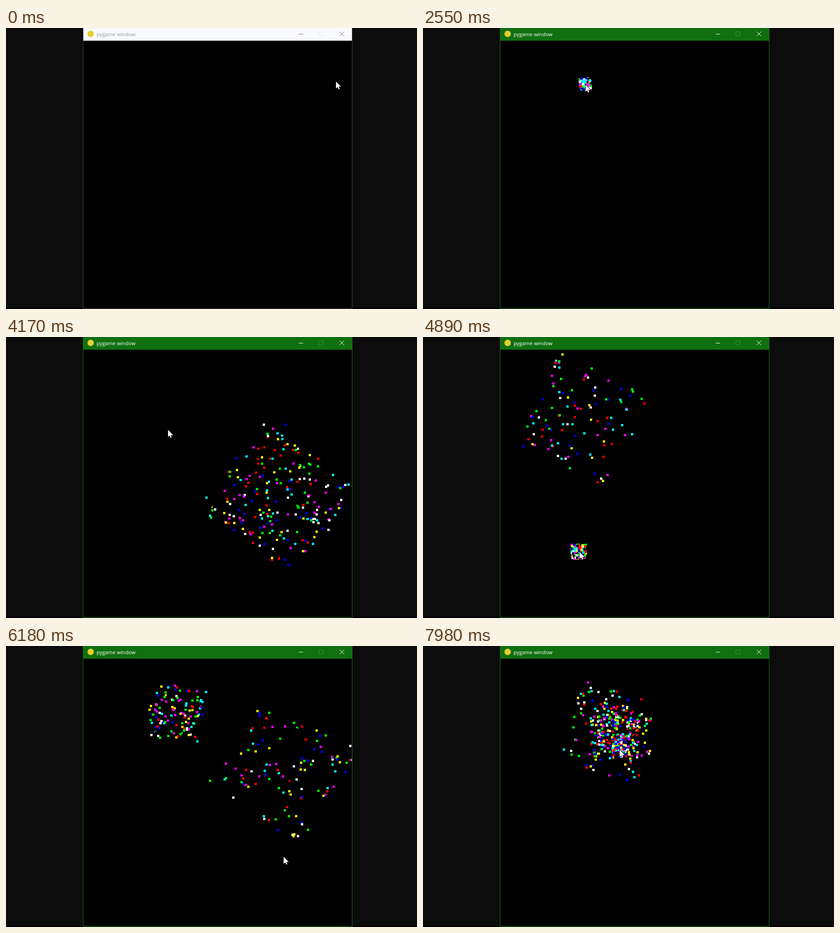
An HTML page with a canvas for the animation above (8000 ms loop, 903x620 px).

```html
<!DOCTYPE html>
<html lang="en">
<head>
<meta charset="utf-8">
<title>pygame window</title>
<style>
  html, body { margin: 0; width: 100%; height: 100%; overflow: hidden; background: #0c0c0c; }
  svg, canvas { position: absolute; left: 0; top: 0; display: block; }
  text { font: 11.3px "Open Sans", "Noto Sans", sans-serif; }
</style>
</head>
<body>
<svg width="903" height="620" viewBox="0 0 903 620">
  <rect width="903" height="620" fill="#0c0c0c"/>
  <rect y="617" width="903" height="3" fill="#050105"/>
  <rect id="frame" x="169" y="0" width="592" height="619"/>
  <rect id="bar" x="170" y="0" width="590" height="28"/>
  <rect x="170" y="28" width="590" height="590" fill="#000"/>
  <circle cx="186" cy="13" r="7" fill="#e6cf2e"/>
  <text id="title" x="199" y="18">pygame window</text>
  <path id="icons" d="M643 13.5h10M733 8l10 10M743 8l-10 10" fill="none"/>
  <rect id="max" x="687.5" y="8.5" width="9" height="9" fill="none"/>
</svg>
<canvas id="stage" width="903" height="620"></canvas>
<script>
const LOOP = 8000, STEP = 30;
const COUNT = 125, LIFE = 915, SIZE = 5, HOLD = 70;
const ROAM = 630, SETTLE = 2250;
const ctx = document.getElementById("stage").getContext("2d");

// where the mouse is pressed: time, x, y
const clicks = [
  [2485, 357, 124], [3355, 602, 377], [3420, 602, 377], [4200, 351, 200],
  [4810, 342, 474], [5424, 611, 290], [5850, 375, 150], [6213, 627, 486],
  [6690, 268, 482], [7055, 485, 187], [7442, 414, 202], [7640, 428, 197],
  [7740, 430, 198], [7900, 431, 215]
];

function random(seed) {
  return () => {
    seed = (seed + 0x6D2B79F5) | 0;
    let n = Math.imul(seed ^ (seed >>> 15), 1 | seed);
    n = (n + Math.imul(n ^ (n >>> 7), 61 | n)) ^ n;
    return ((n ^ (n >>> 14)) >>> 0) / 4294967296;
  };
}

const bursts = clicks.map(([start, x, y], i) => {
  const rnd = random(91 + i * 57);
  const channel = () => (rnd() < 0.5 ? 0 : 255);
  const bits = Array.from({ length: COUNT }, () => ({
    dx: rnd() * 2 - 1,
    dy: rnd() * 2 - 1,
    color: `rgb(${channel()},${channel()},${channel()})`
  }));
  return { start, x, y, bits };
});

const mix = (a, b, u) => a + (b - a) * u;
const ease = u => mix(u, u * u * (3 - 2 * u), 0.6);

function glide([t0, x0, y0], [t1, x1, y1], t) {
  const u = ease(Math.max(0, Math.min(1, (t - t0) / (t1 - t0))));
  return [mix(x0, x1, u), mix(y0, y1, u)];
}

// wide sweep that shrinks to small circles
function roam(t) {
  const age = Math.min(t, SETTLE) - ROAM;
  const size = 1 / (1 + (age / 900) ** 6);
  const turn = age / 780 * 2 * Math.PI;
  return [405 + 226 * size * Math.cos(turn), 200 + 135 * size * Math.sin(turn)];
}

function cursorAt(t) {
  if (t < ROAM) return glide([0, 725, 117], [210, ...roam(ROAM)], t);
  if (t < SETTLE) return roam(t);
  const next = clicks.findIndex(c => c[0] > t);
  if (next === 0) return glide([SETTLE, ...roam(SETTLE)], clicks[0], t);
  if (next < 0) return glide(clicks.at(-1), [7980, 432, 228], t);
  const [start, x, y] = clicks[next - 1];
  const hold = Math.min(HOLD, (clicks[next][0] - start) / 2);
  return glide([start + hold, x, y], clicks[next], t);
}

// the square cloud grows, twists and rises
function drawBurst({ start, x, y, bits }, t) {
  const age = t - start;
  if (age < 0 || age > LIFE) return;
  const half = age * (0.2 - 5e-5 * age);
  const twist = Math.PI / 4 * (age / 860) ** 2.2;
  const rise = 28 * (age / 860) ** 2;
  const c = half * Math.cos(twist), s = half * Math.sin(twist);
  for (const { dx, dy, color } of bits) {
    const px = x + dx * c - dy * s, py = y + dx * s + dy * c - rise;
    ctx.fillStyle = color;
    ctx.fillRect(Math.round(px - SIZE / 2), Math.round(py - SIZE / 2), SIZE, SIZE);
  }
}

const arrow = new Path2D("M0 0V15.5L3.5 12.3L5.8 17.3L8.2 16.2L6 11.4H11Z");

function drawCursor(t) {
  const [x, y] = cursorAt(t);
  ctx.save();
  ctx.translate(Math.round(x), Math.round(y) + 1);
  ctx.lineWidth = 2;
  ctx.strokeStyle = "#000";
  ctx.stroke(arrow);
  ctx.fillStyle = "#fff";
  ctx.fill(arrow);
  ctx.restore();
}

// element, attribute, inactive colour, active colour
const chrome = [
  ["frame", "fill", [66, 66, 66], [22, 122, 22]],
  ["bar", "fill", [248, 250, 253], [16, 112, 16]],
  ["title", "fill", [153, 153, 153], [255, 255, 255]],
  ["icons", "stroke", [112, 112, 112], [255, 255, 255]],
  ["max", "stroke", [232, 234, 237], [52, 146, 52]]
].map(([id, ...rest]) => [document.getElementById(id), ...rest]);

function paintChrome(t) {
  const u = Math.min(1, t / 210);
  for (const [el, attr, off, on] of chrome) {
    const rgb = off.map((c, i) => Math.round(mix(c, on[i], u)));
    el.setAttribute(attr, `rgb(${rgb})`);
  }
}

function draw(t) {
  paintChrome(t);
  ctx.clearRect(0, 0, 903, 620);
  ctx.save();
  ctx.beginPath();
  ctx.rect(170, 28, 590, 590);
  ctx.clip();
  for (const burst of bursts) drawBurst(burst, t);
  ctx.restore();
  drawCursor(t);
}

const begin = performance.now();
function tick() {
  const t = (performance.now() - begin) % LOOP;
  draw(Math.floor(t / STEP) * STEP);
  requestAnimationFrame(tick);
}
tick();
</script>
</body>
</html>
```
